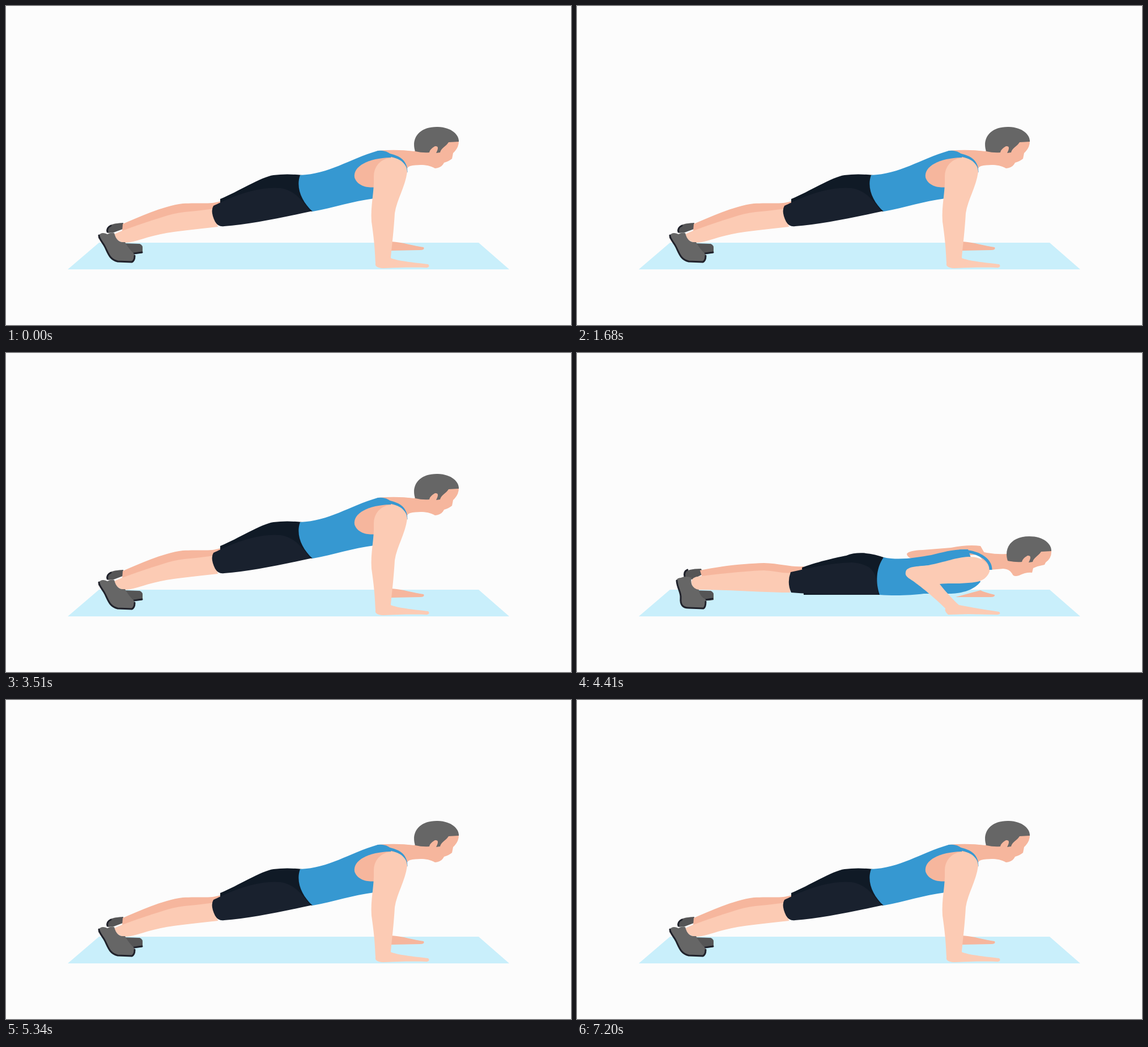
An HTML page that plays this animation: 997x562 px, repeating every 7.56 s.

```html
<!DOCTYPE html>
<html lang="en">
<head>
<meta charset="utf-8">
<title>Push-up and side plank</title>
<style>
  html, body { margin: 0; width: 100%; height: 100%; overflow: hidden; background: #fcfcfc; }
  svg { display: block; width: 100%; height: 100%; }
  .pose { visibility: hidden; }
  .mat { fill: #c9effb; }
  .skin { fill: #fccbb4; }
  .shade { fill: #f6b69d; }
  .shirt { fill: #3698d1; }
  .strap { fill: none; stroke: #3698d1; stroke-width: 5; }
  .shorts { fill: #19212e; }
  .shorts-dark { fill: #101a26; }
  .hair, .shoe { fill: #666; }
  .shoe-far { fill: #555556; }
  .sole { fill: none; stroke: #20222b; stroke-width: 3; stroke-linecap: round; }
</style>
</head>
<body>
<svg viewBox="0 0 997 562" preserveAspectRatio="none">
  <defs>
    <path id="hair" class="hair" d="M722 256C715 235 727 213 760 213C787 213 800 228 799 239L781 240C776 248 768 250 766 258L759 259Q766 246 757 247Q748 252 747 258Q735 259 722 256Z"/>
    <path id="far-toe" class="shoe-far" d="M205 418L236 419Q242 421 241 429V435Q225 438 212 434Z"/>
  </defs>

  <path class="mat" d="M164 417H834L888 464H109Z"/>

  <g class="pose" id="up">
    <path class="shoe-far" d="M178 395C178 387 186 383 207 382L206 393L190 399L180 400Z"/>
    <path class="sole" d="M179 398Q177 391 185 387"/>
    <use href="#far-toe"/>
    <path class="sole" d="M226 436L240 434"/>
    <path class="shade" d="M206 384C240 369 280 352 312 348C340 346 360 350 378 344L376 364C330 362 270 378 205 397Z"/>
    <path class="skin" d="M191 402C215 391 250 380 285 369C310 361 340 362 366 357L374 389C330 394 290 397 260 405C240 410 225 417 208 417C197 414 190 408 191 402Z"/>
    <path class="shoe" d="M163 405Q168 397 179 402Q186 398 191 400C194 412 200 417 210 416C215 425 221 432 227 438Q229 450 222 451L196 450C180 445 178 420 163 409Z"/>
    <path class="sole" d="M164 404C164 411 171 416 175 425C181 438 184 447 197 450L222 451Q227 449 227 440"/>
    <path class="shorts-dark" d="M378 340C410 327 450 301 472 298Q495 295 523 298L541 362L378 354Z"/>
    <path class="shorts" d="M366 352C375 348 380 345 392 340C420 328 455 318 485 321C510 325 525 345 537 362C490 372 430 385 385 388Q375 390 369 380Q360 362 366 352Z"/>
    <path class="shade" d="M655 255Q690 252 720 256L750 240L799 238Q799 250 789 259L787 269Q781 274 773 276Q769 285 757 286C745 279 728 279 713 282Q706 284 706 295L670 290Z"/>
    <use href="#hair"/>
    <path class="shirt" d="M519 298C570 296 605 270 656 255Q670 253 680 262L672 300L650 339C610 344 580 355 541 362C522 345 511 320 519 298Z"/>
    <path class="shade" d="M678 267C640 268 612 282 615 302C620 318 640 321 652 319L680 300Z"/>
    <path class="strap" d="M658 260C682 262 706 266 706 293"/>
    <path class="shade" d="M680 415C700 416 720 423 737 425Q740 430 730 430L680 431Z"/>
    <path class="skin" d="M649 300C650 278 665 268 682 267C700 270 708 282 708 292C704 320 690 340 686 365C684 400 680 430 679 444C690 449 720 452 745 455Q749 459 743 461C715 460 690 461 665 462Q650 461 652 453C651 430 650 415 645 380C643 350 650 330 649 300Z"/>
  </g>

  <g class="pose" id="down">
    <path class="shoe-far" d="M189 388Q194 380 219 380L223 389L204 399L190 397Z"/>
    <path class="sole" d="M190 394Q188 385 195 382"/>
    <use href="#far-toe"/>
    <path class="sole" d="M226 435L239 433"/>
    <path class="shade" d="M217 383C260 374 300 371 330 370C360 371 380 378 400 376L398 390L375 394C330 386 270 392 221 396Z"/>
    <path class="skin" d="M202 405C202 398 205 394 220 393C260 388 300 384 330 383C350 384 365 389 378 387L376 422C330 422 280 417 210 417Q203 413 202 405Z"/>
    <path class="shoe" d="M175 402Q176 396 183 396Q192 392 202 396C200 405 203 415 215 417C216 426 222 432 227 434Q229 448 224 450L193 449C178 445 187 425 175 402Z"/>
    <path class="sole" d="M176 401C177 415 184 421 183 432C182 444 187 449 197 449L223 450Q227 448 227 438"/>
    <path class="shade" d="M582 354Q585 348 610 347L660 343Q690 337 712 340L720 354L600 364Q583 362 582 354Z"/>
    <path class="shorts-dark" d="M397 378C430 366 460 360 475 357C495 349 520 352 544 361L536 426H400Z"/>
    <path class="shorts" d="M377 386C415 378 445 370 485 369C520 372 531 385 531 426C480 425 430 426 378 422Q370 405 377 386Z"/>
    <path class="shade" d="M700 346Q730 356 758 354L790 350L837 348Q838 361 827 369L825 373Q814 375 805 379L803 387Q792 386 780 392Q770 395 768 389Q764 381 752 380L730 382Z"/>
    <use href="#hair" x="38" y="110"/>
    <path class="shirt" d="M541 360C570 366 600 360 625 356C645 351 665 345 690 346L700 375L712 403C700 418 680 423 660 424L612 424C590 427 560 428 534 426C527 405 527 380 541 360Z"/>
    <path class="shade" d="M668 430L712 418C720 422 730 424 737 426Q738 430 730 430Z"/>
    <path class="skin" d="M580 386C581 376 600 376 620 374C650 368 670 360 690 359C715 358 730 372 728 385C722 400 710 404 690 405C670 407 650 405 640 407C650 420 665 436 674 444C700 449 725 453 745 456Q749 460 742 461L690 460L655 461Q648 455 650 450C630 430 607 412 600 407C588 397 578 395 580 386Z"/>
    <path class="strap" d="M675 349C705 348 730 362 730 382"/>
  </g>

  <g class="pose" id="front">
    <path class="shade" d="M300 398C340 395 370 380 414 362L396 340C360 353 330 370 300 398Z"/>
    <path class="skin" d="M366 316C340 328 310 342 290 362C270 380 250 394 234 400L243 422C265 414 290 402 310 391C335 379 350 357 398 345Z"/>
    <path class="shoe" d="M176 440C180 425 190 418 198 413C208 405 220 398 234 397L233 402Q240 408 245 422Q240 429 242 434Q232 438 225 437C223 446 222 451 200 451C185 451 175 448 176 440Z"/>
    <path class="sole" d="M177 443Q180 450 200 450Q219 450 222 444M228 437L239 434"/>
    <path class="shorts" d="M504 236C515 265 540 290 569 305C535 330 480 350 423 363C408 364 405 355 395 345Q375 338 364 314C395 285 430 255 504 236Z"/>
    <path class="shorts-dark" d="M499 238C500 302 450 326 396 345C405 355 408 365 423 363C480 350 535 330 569 305C540 290 515 265 504 236Z"/>
    <path class="shade" d="M572 -2L574 8Q578 18 584 25C584 50 592 75 597 100C602 130 602 150 604 178C595 186 585 190 574 196L610 195L655 168C648 140 635 115 625 98C622 70 610 45 606 25Q614 18 613 -2Z"/>
    <path class="shade" d="M655 168Q670 183 698 173L702 196Q710 203 716 205Q705 213 713 225L680 235L640 215Z"/>
    <path class="skin" d="M703 158Q708 150 720 156L745 148L772 165Q768 185 755 192Q753 202 738 202C720 203 705 198 697 193L698 174Q699 165 703 158Z"/>
    <path class="hair" d="M714 157C725 145 750 138 770 150C785 162 786 175 777 185Q768 193 753 193C765 186 770 178 771 167C762 158 755 152 745 150C735 151 725 154 714 157Z"/>
    <path class="shade" d="M650 271C665 256 690 240 716 231Q722 240 719 262C713 295 697 325 692 350C690 380 680 405 677 416C700 416 715 421 737 425Q740 430 730 429C715 433 690 430 660 431Q649 430 650 424C651 390 648 370 652 350C658 325 665 300 667 268Z"/>
    <path class="shirt" d="M504 236C540 225 570 200 576 196C610 189 640 177 657 167L663 176C643 188 640 208 655 220C675 230 700 226 713 223L715 232C700 238 675 250 667 256L650 272C630 275 605 285 569 305C540 290 515 265 504 236Z"/>
  </g>

  <g class="pose" id="back">
    <path class="shade" d="M370 320C330 343 290 365 270 378C255 390 240 398 230 403L234 416C280 398 330 382 390 350Z"/>
    <path class="skin" d="M227 412C250 405 280 395 310 382C335 370 360 360 388 350L410 381C370 388 340 397 300 408C280 416 255 428 238 432Z"/>
    <path class="shoe" d="M182 442C183 430 195 425 203 415Q215 405 230 404L228 414Q234 422 240 432Q236 440 230 440Q228 452 210 453Q185 453 182 442Z"/>
    <ellipse cx="206" cy="444.5" rx="23" ry="7.5" fill="#1d2631"/>
    <path class="shorts-dark" d="M371 318C400 290 450 265 516 250C525 280 545 305 574 325C530 355 470 375 415 383L388 349Q378 340 371 318Z"/>
    <path class="shorts" d="M388 349C420 340 450 325 470 324C490 330 500 345 540 345C500 365 460 377 415 383Q395 378 388 349Z"/>
    <path class="skin" d="M609 -2Q605 12 609 22L614 45C612 70 620 90 620 120C624 150 625 170 624 193C615 203 605 210 592 217L640 217L675 191C670 160 660 135 650 118C650 90 641 70 639 46C646 38 650 25 649 13L643 11L640 20L637 -2Z"/>
    <path class="skin" d="M677 191Q695 206 721 201Q717 184 731 179L772 220Q770 229 758 228Q742 228 735 232Q718 237 727 250L695 245Z"/>
    <ellipse class="hair" cx="760" cy="198" rx="41" ry="26" transform="rotate(-8 760 198)"/>
    <path class="skin" d="M659 293C668 275 690 257 729 256Q734 265 729 285C722 310 703 335 697 360C693 390 682 420 679 444C700 447 720 450 745 455Q749 460 742 461C715 460 690 461 660 461Q650 459 653 450C653 410 656 385 661 370C665 340 678 320 679 291Z"/>
    <path class="shirt" d="M516 250C550 240 585 225 592 215C630 215 660 205 679 191C678 220 700 242 726 248L728 256C695 260 675 275 660 293C630 296 605 305 574 325C545 305 525 280 516 250Z"/>
  </g>
</svg>
<script>
  const LOOP = 7560;
  // Start time in ms of each held pose
  const schedule = [
    [0, "up"], [720, "down"], [1650, "up"], [2610, "front"], [3510, "up"],
    [4410, "down"], [5310, "up"], [6210, "back"], [7170, "up"]
  ];
  const poses = document.querySelectorAll(".pose");
  const start = performance.now();

  function render() {
    const time = (performance.now() - start) % LOOP;
    const [, current] = schedule.findLast(([from]) => from <= time);
    for (const pose of poses) {
      pose.style.visibility = pose.id === current ? "visible" : "hidden";
    }
    requestAnimationFrame(render);
  }
  render();
</script>
</body>
</html>
```
